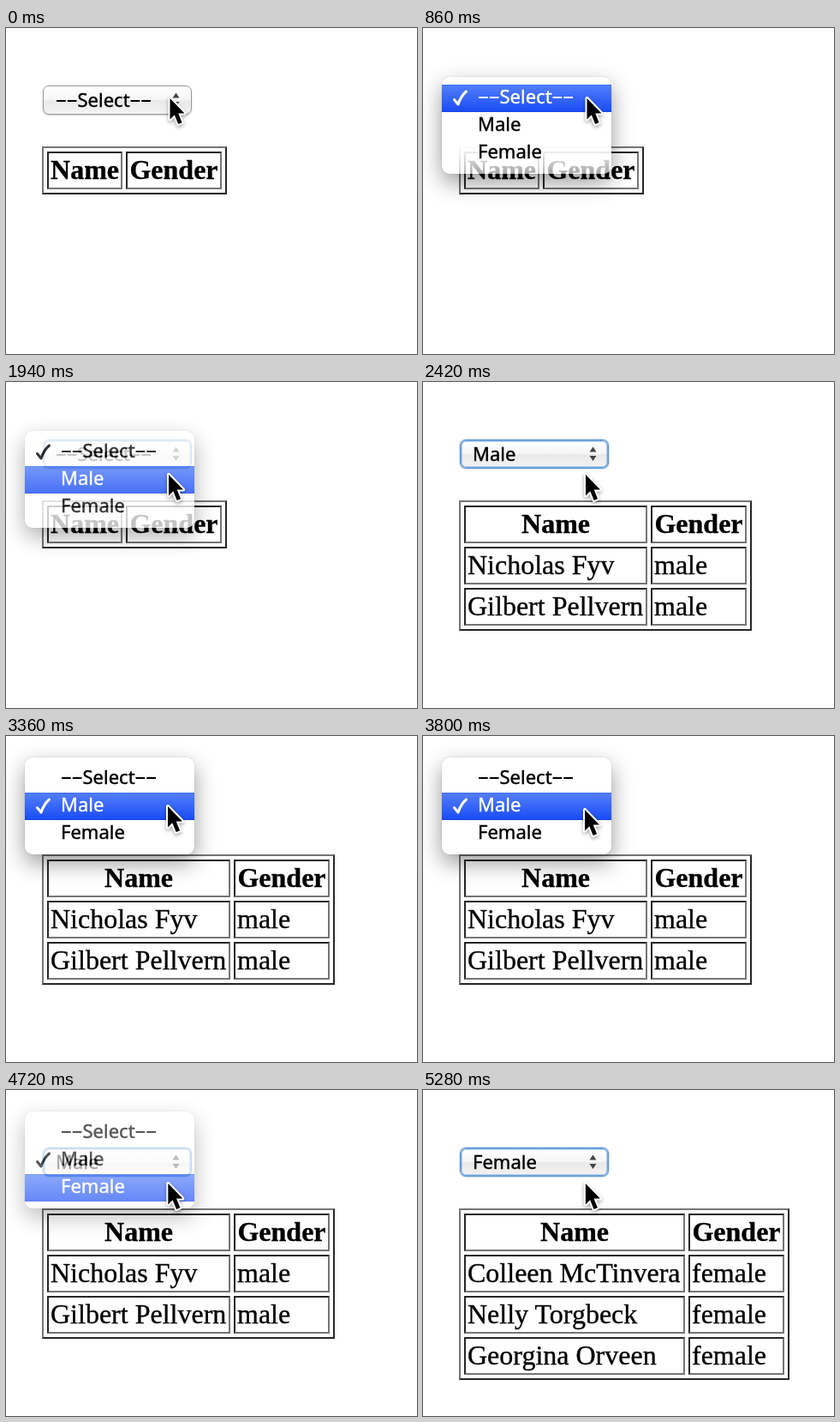
These frames come from a looping animation (480x380 px, 5.66 s). An HTML page:

```html
<!DOCTYPE html>
<html lang="en">
<head>
<meta charset="utf-8">
<title>Filter table by gender</title>
<style>
  html, body { margin: 0; width: 100%; height: 100%; overflow: hidden; background: #fff; }
  #stage { position: relative; width: 480px; height: 380px; overflow: hidden; }
  #stage > * { position: absolute; }

  table {
    left: 42px; top: 138px;
    border: 2px solid; border-color: #757575 #262626 #262626 #757575;
    border-spacing: 4px;
    font: 32px/36px "Liberation Serif", serif; color: #000; white-space: nowrap;
    -webkit-text-stroke: .35px;
  }
  th, td {
    box-sizing: content-box; height: 36px; padding: 1px 2px 3px;
    border: 2px solid; border-color: #262626 #757575 #757575 #262626;
    text-align: left;
  }
  th { text-align: center; }

  #select, .menu {
    font: 22px "Noto Sans", "Open Sans", sans-serif; color: #000; white-space: nowrap;
    -webkit-text-stroke: .4px;
  }
  .dash { font-size: 25.5px; line-height: 0; -webkit-text-stroke: 0; }

  #select {
    box-sizing: border-box; left: 43px; top: 67px; width: 174px; height: 34px;
    border: 1.5px solid #989898; border-radius: 7px;
    background: linear-gradient(#fff, #f6f6f6 48%, #e9e9e9 52%, #f3f3f3);
    box-shadow: 0 1px 2px rgba(0, 0, 0, .2);
  }
  #select.focus {
    border-color: #5c92d1;
    box-shadow: inset 0 0 0 1.5px #79aae2, 0 0 2px #6ea2dd;
  }
  #label { position: absolute; left: 14px; line-height: 31px; }
  #select svg { position: absolute; left: 149px; top: 7px; }

  .menu {
    left: 22px; width: 198px; height: 96px; padding: 9px 0 8px;
    border-radius: 9px; background: rgba(255, 255, 255, .97);
    box-shadow: 0 0 1px rgba(0, 0, 0, .4), 0 10px 26px rgba(0, 0, 0, .4);
  }
  .menu.settling { background: linear-gradient(#fff 70%, rgba(255, 255, 255, .65)); }
  .item { position: relative; height: 32px; padding-left: 42px; line-height: 27px; }
  .item.on { color: #fff; background: linear-gradient(#3f6df0, #517cfa 6%, #1b4ef7 95%, #1442da); }
  .item svg { position: absolute; left: 12px; top: 5px; }

  #cursor { left: -6px; top: -6px; filter: drop-shadow(0 2px 2px rgba(0, 0, 0, .35)); }
</style>
</head>
<body>
<div id="stage">
  <div id="select">
    <span id="label"></span>
    <svg width="12" height="18"><path d="M1.5 6.5 5.5 .5 9.5 6.5zM1.5 11h8l-4 6z" fill="#444"/></svg>
  </div>
  <svg id="cursor" width="40" height="50">
    <path transform="translate(6 6)" d="M.5 2V26.5L5.8 21.2 10.2 32 14.6 30.2 10.2 19.5H17.5Z"
      fill="#000" stroke="#fff" stroke-width="4" stroke-linejoin="round" paint-order="stroke"/>
  </svg>
</div>
<script>
const LOOP = 5660;
const $ = id => document.getElementById(id);
const dash = '<span class="dash">––</span>';
const options = [dash + 'Select' + dash, 'Male', 'Female'];
const groups = [
  { width: 80, gender: '', names: [] },
  { width: 206, gender: 'male', names: ['Nicholas Fyv', 'Gilbert Pellvern'] },
  { width: 250, gender: 'female', names: ['Colleen McTinvera', 'Nelly Torgbeck', 'Georgina Orveen'] }
];
const tick = '<svg width="20" height="22"><path d="M2.5 12.5 7 18Q10.5 8 16.5 3" fill="none" ' +
  'stroke="currentColor" stroke-width="3" stroke-linecap="round" stroke-linejoin="round"/></svg>';

function add(tag, html) {
  const el = document.createElement(tag);
  el.innerHTML = html;
  $('stage').insertBefore(el, $('cursor'));
  return el;
}

const tables = groups.map(g => add('table',
  `<tr><th style="width:${g.width}px">Name</th><th style="width:104px">Gender</th></tr>` +
  g.names.map(n => `<tr><td>${n}</td><td>${g.gender}</td></tr>`).join('')));

function makeMenu(top, checked) {
  const el = add('div', options.map((o, i) =>
    `<div class="item">${i === checked ? tick : ''}${o}</div>`).join(''));
  el.className = 'menu';
  el.style.top = top + 'px';
  return el;
}

// Each menu blinks its choice once, then fades out.
const menus = [
  { el: makeMenu(57, 0), top: 57, open: 860, off: 1740, on: 1800, fade: 1900, close: 2100 },
  { el: makeMenu(25, 1), top: 25, open: 3360, off: 4600, on: 4650, fade: 4660, close: 4840 }
];

// time, x, y
const path = [
  [0, 191, 80], [1140, 191, 80], [1300, 191, 112], [1480, 191, 112], [1500, 189.5, 106],
  [2860, 189.5, 106], [3000, 188.5, 80], [3700, 188.5, 80], [4120, 188.5, 107], [LOOP, 189.5, 107]
];

function cursorAt(t) {
  const i = path.findIndex(p => p[0] > t);
  const [t0, x0, y0] = path[i - 1], [t1, x1, y1] = path[i];
  const u = (t - t0) / (t1 - t0), k = u * u * (3 - 2 * u);
  return [x0 + (x1 - x0) * k, y0 + (y1 - y0) * k];
}

let shown = -1;
function choose(n) {
  if (n === shown) return;
  shown = n;
  $('label').innerHTML = options[n];
  tables.forEach((el, i) => el.style.visibility = i === n ? 'visible' : 'hidden');
}

function drawMenu(m, t, y) {
  const open = t >= m.open && t < m.close;
  m.el.style.visibility = open ? 'visible' : 'hidden';
  if (!open) return;
  m.el.style.opacity = t < m.fade ? 1 : (m.close - t) / (m.close - m.fade);
  m.el.classList.toggle('settling', t < m.open + 40);
  const blink = t >= m.off && t < m.on;
  const row = blink ? -1 : Math.floor((y - m.top - 9) / 32);
  [...m.el.children].forEach((item, i) => item.classList.toggle('on', i === row));
}

function draw(t) {
  const [x, y] = cursorAt(t);
  $('cursor').style.transform = `translate(${x}px, ${y}px)`;
  $('select').classList.toggle('focus', t >= menus[0].open);
  choose(menus.filter(m => t >= m.close - 20).length);
  menus.forEach(m => drawMenu(m, t, y));
}

const start = performance.now();
function frame() {
  draw((performance.now() - start) % LOOP);
  requestAnimationFrame(frame);
}
frame();
</script>
</body>
</html>
```
